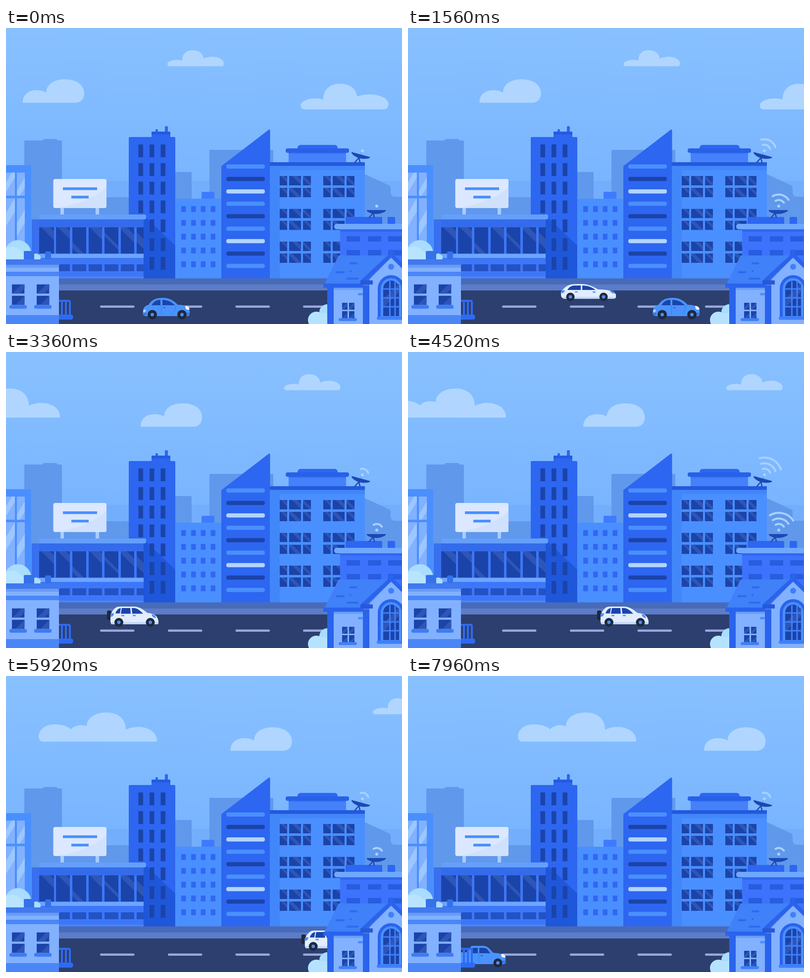
An HTML page for the animation above (8 s loop, 800 px wide and 600 px high).

```html
<!DOCTYPE html>
<html lang="en">
<head>
<meta charset="utf-8">
<title>City street</title>
<style>
html, body { margin: 0; width: 100%; height: 100%; overflow: hidden; background: #7fb9ff; }
#stage { display: block; width: 100vw; height: 100vh; }
</style>
</head>
<body>
<svg id="stage" viewBox="0 0 800 600" xmlns="http://www.w3.org/2000/svg"></svg>
<script>
const NAVY = '#1b44aa', SHINE = '#2f56b6', ROYAL = '#2d66f0', BLUE = '#4a8fff',
  PALE = '#82b1ff', FAR = '#6098ec', CLOUD = '#b0d6ff', WHITE = '#e2edff', TYRE = '#20283b';

// Shape helpers
const box = (x1, y1, x2, y2, fill, r = 0) =>
  `<rect x="${x1}" y="${y1}" width="${x2 - x1}" height="${y2 - y1}" rx="${r}" fill="${fill}"/>`;
const path = (d, fill) => `<path d="${d}" fill="${fill}"/>`;
const line = (d, stroke, w) =>
  `<path d="${d}" fill="none" stroke="${stroke}" stroke-width="${w}" stroke-linecap="round" stroke-linejoin="round"/>`;
const dot = (x, y, r, fill) => `<circle cx="${x}" cy="${y}" r="${r}" fill="${fill}"/>`;
const grid = (xs, ys, draw) => ys.map((y, j) => xs.map((x, i) => draw(x, y, i, j)).join('')).join('');
const group = (id, body) => `<g id="${id}">${body}</g>`;

// Window with a diagonal reflection, clipped to the pane; slope 1 falls to the right, -1 rises
function pane(x1, y1, x2, y2, at, width, slope = 1, fill = NAVY, shine = SHINE) {
  const w = x2 - x1, h = y2 - y1, k = slope * h;
  const band = width ? path(`M${at} 0h${width}l${k} ${h}h${-width}z`, shine) : '';
  return `<svg x="${x1}" y="${y1}" width="${w}" height="${h}">${box(0, 0, w, h, fill)}${band}</svg>`;
}

const sky = () => `<defs><linearGradient id="air" x2="0" y2="1">
  <stop stop-color="#89c1ff"/><stop offset=".55" stop-color="#78b4ff"/><stop offset="1" stop-color="#70adff"/>
  </linearGradient></defs>` + box(0, 0, 800, 600, 'url(#air)');

const clouds = () =>
  group('cloudA', path('M331 77.500Q326 77 326 73C326 66 345 62 356 66C356 52 364 45 377 45C391 45 399 53 399 62C418 54 440 60 440 72Q440 77.500 435 77.500Z', CLOUD)) +
  group('cloudB', path('M34 151.500C33 135 46 126 62 126Q74 126 81 131C82 113 98 104 119 104C143 104 158 116 158 132C158 145 150 151.500 140 151.500Z', CLOUD)) +
  group('cloudC', path('M603 165Q595 164 595 157C596 145 622 139 641 145C641 124 655 113 675 113C697 113 709 126 709 139C737 128 773 138 773 155Q772 165 762 165Z', CLOUD)) +
  group('cloudD', path('M74 133Q66 132 66 122C67 106 82 98 99 98Q120 98 131 108C140 99 153 98 163 102C163 85 180 74 203 74C227 74 242 87 242 109C268 96 305 106 305 131Q305 133 301 133Z', CLOUD));

const skyline = () =>
  box(0, 310, 800, 520, '#73aefd') +
  box(37, 228, 113, 520, FAR, 2) + box(74, 225, 104, 235, FAR, 4) +
  box(113, 343, 250, 520, FAR) + box(340, 292, 375, 520, FAR, 2) + box(411, 247, 540, 520, FAR, 2) +
  path('M720 294L774 319Q777 320 777 324V334Q778 342 786 342H800V520H720Z', FAR);

const glassTower = () => box(-5, 278, 51, 480, BLUE, 2) +
  pane(0, 293, 18, 340, 12, 12, -.6, PALE, '#9cc7ff') + pane(22, 293, 38, 340, 22, 12, -.6, PALE, '#9cc7ff') +
  pane(0, 345, 18, 470, 18, 16, -.6, PALE, '#9cc7ff') + pane(22, 345, 38, 470, 30, 16, -.6, PALE, '#9cc7ff');

const tower = () =>
  box(302, 205, 307, 215, ROYAL, 2) + box(321, 199, 327, 215, ROYAL, 2) +
  box(294, 210, 332, 222, '#245be0', 1) + box(294, 216, 332, 222, ROYAL) +
  box(248, 221, 342, 508, ROYAL, 2) + path('M278 380L342 441V508H278Z', '#1f57da') +
  grid([267.500, 290, 312.500], [236, 274, 311.500, 349.500, 388, 426, 464], (x, y) => box(x, y, x + 9.500, y + 26, NAVY));

const office = () => {
  const xs = [67, 101, 134, 167, 199, 232, 264], ends = [97, 129, 162, 194, 227, 259, 278];
  const bands = [[4, 18], [4, 16], [-42, 12], [2, 20], [-18, 8], [-4, 16], [-30, 20]];
  return box(110, 360, 117, 380, '#a9ccff') + box(181, 360, 188, 380, '#a9ccff') +
    box(95.500, 306, 203, 365, '#dbe8ff', 4) + path('M203 322V361Q203 365 199 365H100C145 358 180 345 203 322Z', '#d0e1fd') +
    box(115, 323, 184, 328.500, BLUE) + box(132, 340, 167, 345.500, BLUE) +
    box(52, 388, 278, 508, '#3d77f8') + box(52, 388, 67, 508, '#3870ef') + box(67, 388, 278, 404, '#346bea') +
    box(67, 378, 283, 388, '#649ffb', 3) +
    xs.map((x, i) => pane(x, 404, ends[i], 458, ...bands[i])).join('') +
    box(67, 457.500, 278, 466, '#6ca6ff') +
    xs.map((x, i) => box(x, 479, ends[i], 493, '#2352c4')).join('') + box(67, 504, 278, 508, '#4a86fc');
};

const midBlock = () => box(395, 332, 421, 350, '#3f7bff', 2) + box(342.500, 346, 436, 508, BLUE) +
  grid([354, 374, 393.500, 413.500], [361, 389, 417, 445, 473], (x, y) => box(x, y, x + 9.500, y + 12, '#3167f2', 1));

const slantTower = () => {
  const tones = [BLUE, NAVY, '#b2d4ff', BLUE, NAVY, BLUE, '#b2d4ff', NAVY, BLUE];
  return path('M435 280L531 206Q533.500 205 533.500 208V508H435Z', ROYAL) +
    tones.map((c, i) => box(445, 276.500 + i * 25.200, 523, 285 + i * 25.200, c, 4)).join('');
};

const flats = () => box(571, 250, 687, 274, '#4581fa') + box(571, 252, 687, 255, '#3a74f0') +
  box(589, 237, 670, 250, ROYAL, 6) + box(565, 244, 693, 253, '#2860e8', 4) +
  box(533, 272, 725, 508, BLUE) + box(533, 279, 553, 508, '#4187fa') + box(533, 279, 725, 288, '#4187fa') +
  box(533, 272, 725, 279.500, '#2459dc', 1) +
  grid([553, 641], [300, 366.500, 433], (x, y) =>
    grid([0, 19, 47], [0, 24], (dx, dy, i, j) =>
      pane(x + dx, y + dy, x + dx + [15, 24, 16][i], y + dy + 19, [2, j ? -4 : 6, j ? 0 : -6][i], i == 1 ? 10 : 7)));

const annex = () => box(686, 383, 760, 400, ROYAL, 2) + box(771, 383, 786, 400, ROYAL, 2) +
  box(675, 404, 800, 520, '#3d73fc') + box(675, 408, 800, 413, '#3167ef') + box(663, 397, 810, 408, '#6fa8ff', 5) +
  grid([688, 731, 772], [422, 450], (x, y) => box(x, y, x + 27, y + 11, '#285de0'));

function dish(x, y, turn) {
  const ray = (r, a) => [r * Math.cos(a * Math.PI / 180), r * Math.sin(a * Math.PI / 180)].map(n => n.toFixed(1)).join(' ');
  const waves = [12.400, 23.500, 35].map((r, i) =>
    `<g class="wave${i}">${line(`M${ray(r, -121)}A${r} ${r} 0 0 1 ${ray(r, -33)}`, '#a9d1ff', 4)}</g>`).join('');
  return `<g transform="translate(${x} ${y})">` + line('M-7 14L-15 23M-7 14L-5 23', '#1c48b4', 2.500) +
    `<g transform="rotate(${turn})">` + line('M0 0L-2 10', '#5b90ea', 1) +
    path('M-20 8H18Q19 9 17 11Q8 16 -1 16Q-12 16 -19 11Q-21 9 -20 8Z', '#1c48b4') +
    dot(0, 0, 3, '#a9d1ff') + waves + '</g></g>';
}

const road = () => box(0, 507.500, 800, 520, '#486bb9') + box(0, 520, 800, 532, '#5d7cc8') + box(0, 532, 800, 600, '#2c3f6e') +
  [190, 327, 463.500, 600].map(x => box(x, 562.500, x + 69.500, 567, '#98a9dc', 2)).join('');

const wheel = (x, y, r) => dot(x, y, r, TYRE) + dot(x, y, 3.400, BLUE);

const sedan = () =>
  path('M156 537Q156 533 160 530C167 522 174 519 187 519H198C212 519 222 525 231 530C247 530 262 532 267 540V545Q267 548.500 262 548.500H162Q156 547 156 541Z', WHITE) +
  box(160, 545, 264, 549, '#c4d7fa', 2) +
  path('M169 531C173 524 178 522 185 522H196V531Z', NAVY) + path('M199 522C212 522 219 526 226 531H199Z', NAVY) +
  path('M157 533Q160 530 164 532Q163 537 157 538Z', BLUE) + path('M255 532Q264 533 266 538Q257 539 255 532Z', BLUE) +
  box(184, 534, 190, 536, BLUE, 1) + box(220, 534, 226, 536.500, BLUE, 1) +
  wheel(175, 545, 8.500) + wheel(242, 545, 8.500);

const suv = () => box(204, 524, 213, 543, TYRE, 3) +
  path('M211 533C217 520 222 516 230 516H258C270 516 278 523 286 529C300 530 306 535 308 545V549Q308 551.500 304 551.500H215Q211 551 211 546Z', WHITE) +
  box(212, 547.500, 308, 552, '#c4d7fa', 2) +
  path('M221 530Q224 520 232 519L230 530Z', NAVY) + path('M234 519H251L252 530.500H232Z', NAVY) +
  path('M254 519H259C267 520 273 526 277 530.500H255Z', NAVY) +
  path('M211 531Q216 528 218 530Q218 536 211 537Z', BLUE) + path('M294 531Q302 533 303 539Q296 540 294 531Z', BLUE) +
  box(233, 533, 239, 535.500, BLUE, 1) + box(256, 533, 262, 535.500, BLUE, 1) +
  wheel(228, 548, 9) + wheel(291.500, 548, 9);

const beetle = () =>
  path('M277 575C277 566 281 563 288 561C294 551 303 547 316 547C333 547 341 555 347 561C361 561 369 565 371 573V580Q371 584 366 584H282Q277 583 277 578Z', '#4a93ff') +
  path('M294 562C298 554 305 551 312 551V562Z', NAVY) + path('M316 551C328 551 335 556 341 562H316Z', NAVY) +
  line('M314 562V580M343 564Q341 575 336 580', '#3578ea', 1) + box(317, 566, 323, 568, '#2d66d8', 1) +
  box(276, 577, 284, 582, '#3578ea', 2) + box(363, 577, 371, 582, '#3578ea', 2) +
  path('M277 572Q281 569 283 572Q282 577 277 577Z', '#a9d1ff') +
  path('M362 563Q370 564 371 570Q367 573 363 569Z', '#f2f7ff') +
  wheel(295.500, 581, 9.500) + wheel(355.500, 581, 9.500);

const pickup = () =>
  path('M80 560H121L126 550Q127 547 131 547H152Q159 547 165 553L172 561C186 562 195 564 197 571V580Q197 584 193 584H84Q80 584 80 580Z', '#4a93ff') +
  path('M128 562L131 551H141V562Z', NAVY) + path('M144 551H152Q158 551 161 555L166 562H144Z', NAVY) +
  line('M143 562V580', '#3578ea', 1) + box(146, 566, 152, 568, '#2d66d8', 1) + box(189, 577, 198, 582, '#3578ea', 2) +
  path('M188 563Q196 564 197.500 570Q193 572 189 569Z', '#f2f7ff') +
  wheel(98, 581.500, 9) + wheel(181.500, 581.500, 9);

const leftHouse = () =>
  line('M107 553H127Q129 553 129 556V584M113 553V584M121 553V584', '#2f6af2', 4) + box(95, 581, 135.500, 591, '#2f6af2', 4) +
  box(36, 452, 57, 475, '#3571ea', 2) + box(79, 453, 91, 475, '#3571ea', 2) +
  box(0, 480, 107, 600, PALE) + box(0, 480, 107, 486, '#6b9cf6') + box(0, 494, 107, 503, '#4a86f8') +
  box(-5, 469, 110, 480, '#4179ee', 2) + box(0, 582, 107, 600, '#4a86f5') +
  grid([12, 62], [519.500, 542.500], (x, y, i, j) => pane(x, y, x + 25.500, y + 19, j ? 26 : 20, 14, -1)) +
  grid([7, 57], [561.500], (x, y) => box(x, y, x + 35, y + 7.500, '#3f7bf2', 3));

const rightHouse = () =>
  dot(649, 576, 16, '#a9dcff') + dot(627, 592, 17, '#b5e3ff') + box(630, 578, 650, 600, '#b5e3ff') +
  box(649, 522, 800, 600, '#2a63ec') + box(662, 526, 721, 600, PALE) + box(662, 526, 721, 531, '#6a9ff8') +
  path('M672 461H775L722 519L641 524Z', '#4080f8') +
  [[694, 475, 710], [666, 493, 684], [694, 491, 698], [688, 506, 712]].map(([x, y, end]) => box(x, y, end, y + 4, '#2e6af0', 2)).join('') +
  box(641, 518, 722, 526.500, '#2a63ec', 1) +
  path('M734 600V510L778 465L810 497V600Z', PALE) +
  line('M721 513L778 460L810 491', '#2a63ec', 8) + box(774, 449, 782, 462, '#2a63ec', 2) +
  box(716, 511.500, 741, 520, '#2459dc', 1) + dot(778, 484, 6, '#3f7ff8') +
  path('M751 588V528A27 27 0 0 1 805 528V588Z', '#2a63ec') +
  path('M757 588V528A21 21 0 0 1 799 528V588Z', BLUE) +
  path('M762 584V528A16 16 0 0 1 794 528V584Z', NAVY) +
  path('M762 550L794 518V535L762 567Z', SHINE) +
  line('M775.500 514V584M786 514V584M763 529H794M763 547H794M763 565H794', '#3f7ff8', 3) +
  box(749, 585, 810, 591.500, '#3f7ff8', 3) +
  grid([679, 693], [557, 574], (x, y, i, j) => pane(x, y, x + 11, y + 14, j ? 14 : 10, 7, -1)) +
  box(672, 588, 709, 594, '#3f7ff8', 3) + box(711, 537, 721, 542, BLUE, 2);

const bushes = () => dot(24, 457, 27, '#a9dcff') + dot(61, 466, 9, '#a9dcff') + path('M0 446Q26 434 42 470H0Z', '#b8e4ff');

const stage = document.getElementById('stage');
stage.innerHTML = [
  sky(), clouds(), skyline(), glassTower(), tower(), office(), midBlock(), slantTower(), flats(),
  dish(720, 249, 15), annex(), dish(749, 361, 0), road(),
  group('sedan', sedan()), group('suv', suv()), group('beetle', beetle()), group('pickup', pickup()),
  bushes(), leftHouse(), rightHouse()
].join('');

// Each mover: time at which it stands as drawn (ms), speed (px per ms)
const movers = Object.entries({
  cloudA: [0, .0701], cloudB: [0, .0709], cloudC: [0, .0741], cloudD: [5920, .0765],
  sedan: [1000, .2733], suv: [3360, .1534], beetle: [0, .1398], pickup: [7960, .14]
}).map(([id, [time, speed]]) => ({ el: document.getElementById(id), time, speed }));
const waves = [0, 1, 2].map(i => stage.querySelectorAll('.wave' + i));

const LOOP = 8000, STEP = 40, PULSE = 2400;

function draw() {
  const t = Math.floor(performance.now() % LOOP / STEP) * STEP;
  for (const { el, time, speed } of movers)
    el.setAttribute('transform', `translate(${((t - time) * speed).toFixed(2)} 0)`);
  const shown = Math.floor(t % PULSE / (PULSE / 4));
  waves.forEach((set, i) => set.forEach(el => el.setAttribute('visibility', i < shown ? 'visible' : 'hidden')));
  requestAnimationFrame(draw);
}
draw();
</script>
</body>
</html>
```
